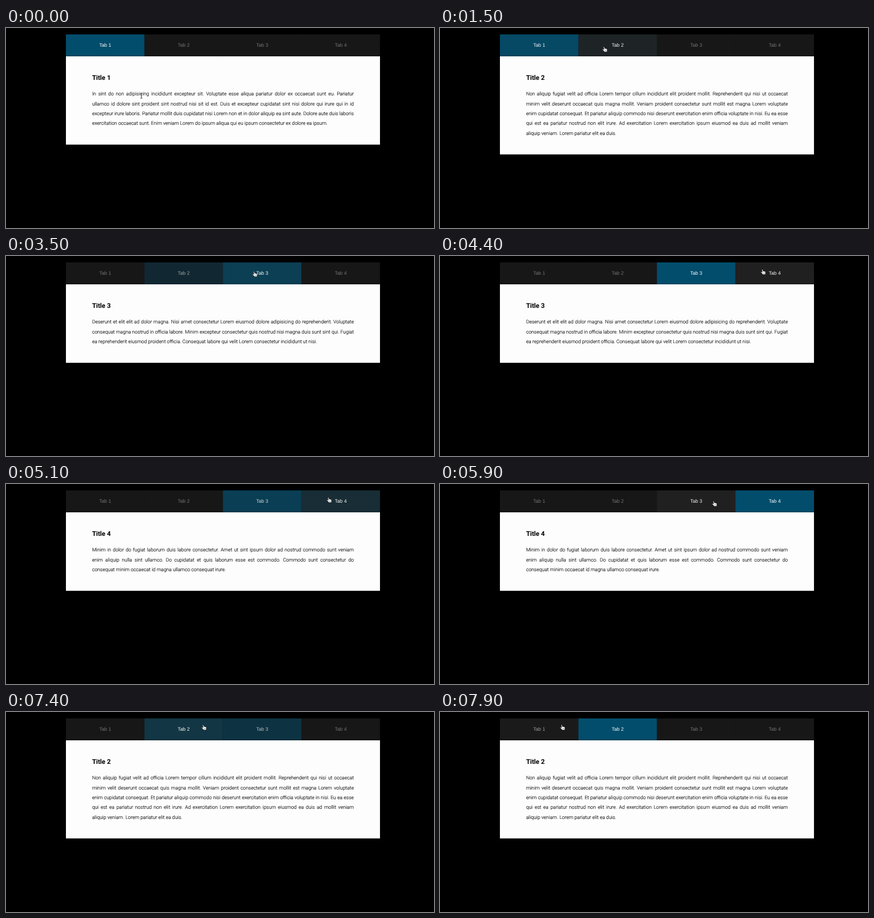
Write an HTML page that moves like this. It is 800 by 374 pixels and loops after 8000 ms.

```html
<!DOCTYPE html>
<html lang="en">
<head>
<meta charset="utf-8">
<title>Tabs</title>
<style>
  html, body { margin: 0; width: 100%; height: 100%; overflow: hidden; background: #000; }
  #widget {
    position: absolute; left: 111.9px; top: 11.9px; width: 960px;
    transform: scale(.6115); transform-origin: 0 0;
    text-rendering: geometricPrecision;
  }
  #tabs { display: flex; background: #171717; }
  #tabs div {
    flex: 1; height: 67px;
    font: 15px/67px "Liberation Sans", Arial, sans-serif; text-align: center;
  }
  #panel {
    position: relative; padding: 50px 80px; background: #fdfdfd;
    box-shadow: 0 0 5px rgba(0, 0, 0, .4);
    font: 300 15px/30px Roboto, sans-serif; color: #000;
  }
  h2 { margin: 0 0 20px; font-size: 20px; font-weight: 700; line-height: 30px; }
  p { margin: 0; white-space: nowrap; text-align-last: justify; -webkit-text-stroke: .2px; }
  p:last-child { text-align-last: left; }
  svg { position: absolute; left: 0; top: 0; width: 1px; height: 1px; overflow: visible; }
</style>
</head>
<body>
<div id="widget">
  <div id="tabs"></div>
  <div id="panel"></div>
</div>
<svg>
  <g id="cursor">
    <path id="beam" d="M-2-4.8Q0-4.8 0-3.5V3.5Q0 4.8-2 4.8M2-4.8Q0-4.8 0-3.5M0 3.5Q0 4.8 2 4.8M-1 2H1" fill="none" stroke="#222" stroke-width=".8"/>
    <path id="arrow" d="M-3-5V5L-.8 3 .8 6.5 2.2 5.9.7 2.4H3.8Z" fill="#111" stroke="#fff" stroke-width=".8"/>
    <g id="hand">
      <path d="M-2.5-4.4C-2.1-5.3-.9-5.1-.7-4.2L-.1-1.6C.6-2.1 1.2-1.9 1.5-1.4 2.2-1.8 2.8-1.5 3-.9 3.8-1.2 4.4-.7 4.5 0 4.9 1.6 4.7 2.7 4 4.7H-.6C-1.3 3.4-2.6 2.2-4 .8-4.6-.1-3.6-.8-2.7-.2L-1.6.5Z" fill="#fff" stroke="#111" stroke-width=".7"/>
      <path d="M.6 1V3M2 1V3M3.3 1V3" stroke="#333" stroke-width=".5"/>
    </g>
  </g>
</svg>
<script>
const LOOP = 8000, STEP = 100, FADE = 500, SAMPLE = 20;
const LEFT = 111.9, TAB_WIDTH = 146.75, TAB_BOTTOM = 53;

const pages = [
  ["In sint do non adipisicing incididunt excepteur sit. Voluptate esse aliqua pariatur dolor ex occaecat sunt eu. Pariatur",
   "ullamco id dolore sint proident sint nostrud nisi sit id est. Duis et excepteur cupidatat sint nisi dolore qui irure qui in id",
   "excepteur irure laboris. Pariatur mollit duis cupidatat nisi Lorem non et in dolor aliquip ea sint aute. Dolore aute duis laboris",
   "exercitation occaecat sunt. Enim veniam Lorem do ipsum aliqua qui eu ipsum consectetur ex dolore ea ipsum."],
  ["Non aliquip fugiat velit ad officia Lorem tempor cillum incididunt elit proident mollit. Reprehenderit qui nisi ut occaecat",
   "minim velit deserunt occaecat quis magna mollit. Veniam proident consectetur sunt mollit est magna Lorem voluptate",
   "enim cupidatat consequat. Et pariatur aliquip commodo nisi deserunt exercitation enim officia voluptate in nisi. Eu ea esse",
   "qui est ea pariatur nostrud non elit irure. Ad exercitation Lorem exercitation ipsum eiusmod ea duis ad mollit veniam",
   "aliquip veniam. Lorem pariatur elit ea duis."],
  ["Deserunt et elit elit ad dolor magna. Nisi amet consectetur Lorem eiusmod dolore adipisicing do reprehenderit. Voluptate",
   "consequat magna nostrud in officia labore. Minim excepteur consectetur quis nostrud nisi magna duis sunt sint qui. Fugiat",
   "ea reprehenderit eiusmod proident officia. Consequat labore qui velit Lorem consectetur incididunt ut nisi."],
  ["Minim in dolor do fugiat laborum duis labore consectetur. Amet ut sint ipsum dolor ad nostrud commodo sunt veniam",
   "enim aliquip nulla sint ullamco. Do cupidatat et quis laborum esse est commodo. Commodo sunt consectetur do",
   "consequat minim occaecat id magna ullamco consequat irure."]
];

// Background r, g, b and text grey of each tab state
const idle = [23, 23, 23, 116], hover = [32, 32, 32, 245], active = [3, 77, 108, 255];

// Cursor moves: leave, arrive, x, y. It rests in between.
const moves = [
  [50, 600, 308, 40], [1800, 2200, 420, 23], [2200, 2600, 465, 34], [3500, 3900, 560, 10],
  [3900, 4200, 604, 30], [5200, 5600, 513, 37], [6200, 6700, 370, 29], [7400, 7900, 229, 29]
];
const clickTimes = [1480, 3180, 4980, 6080, 7180];

const $ = id => document.getElementById(id);

function cursorAt(t) {
  let x = 253, y = 127;
  for (const [leave, arrive, toX, toY] of moves) {
    const k = Math.min(1, Math.max(0, (t - leave) / (arrive - leave)));
    const eased = k * k * (3 - 2 * k);
    x += (toX - x) * eased;
    y += (toY - y) * eased;
  }
  return [x, y];
}

function tabUnderCursor(t) {
  const [x, y] = cursorAt(t);
  return y < TAB_BOTTOM ? Math.floor((x - LEFT) / TAB_WIDTH) : -1;
}

function pageAt(t) {
  const last = clickTimes.filter(time => time <= t).pop();
  return last ? tabUnderCursor(last) : 0;
}

// A linear fade is the mean of the states over the last FADE ms.
function tabColors(t) {
  const colors = pages.map(() => [0, 0, 0, 0]);
  for (let age = 0; age < FADE; age += SAMPLE) {
    const page = pageAt(t - age), over = tabUnderCursor(t - age);
    colors.forEach((color, i) => {
      const state = i === page ? active : i === over ? hover : idle;
      state.forEach((value, c) => color[c] += value * SAMPLE / FADE);
    });
  }
  return colors;
}

const tabs = pages.map((_, i) => {
  const tab = $("tabs").appendChild(document.createElement("div"));
  tab.textContent = `Tab ${i + 1}`;
  return tab;
});

let shown = -1;
function showPage(page) {
  if (page === shown) return;
  shown = page;
  $("panel").innerHTML = `<h2>Title ${page + 1}</h2>` + pages[page].map(line => `<p>${line}</p>`).join("");
}

function draw(now) {
  const t = Math.floor(Math.max(0, now - start) % LOOP / STEP) * STEP;
  tabColors(t).forEach(([r, g, b, grey], i) => {
    tabs[i].style.background = `rgb(${r}, ${g}, ${b})`;
    tabs[i].style.color = `rgb(${grey}, ${grey}, ${grey})`;
  });
  showPage(pageAt(t));

  const [x, y] = cursorAt(t);
  const kind = y < TAB_BOTTOM ? "hand" : y > 112 ? "beam" : "arrow";
  for (const id of ["hand", "beam", "arrow"]) $(id).style.display = id === kind ? "" : "none";
  $("cursor").setAttribute("transform", `translate(${x} ${y})`);
  requestAnimationFrame(draw);
}

const start = performance.now();
draw(start);
</script>
</body>
</html>
```
